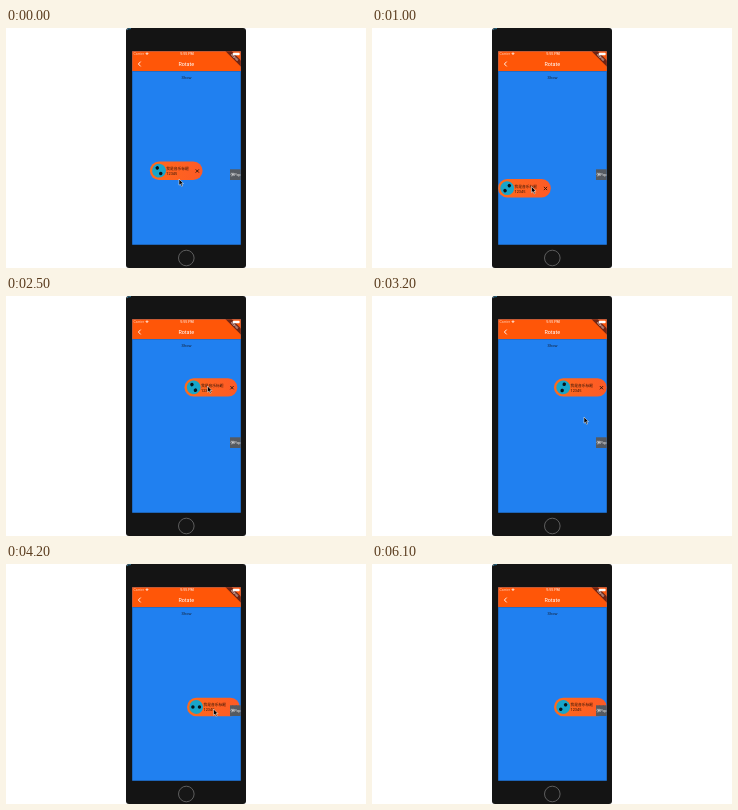
An HTML page for the animation above (6.2 s loop, 360 by 240 pixels).

```html
<!DOCTYPE html>
<html lang="zh">
<head>
<meta charset="utf-8">
<style>
  html, body { margin: 0; width: 100%; height: 100%; overflow: hidden; background: #fff; }
  svg { display: block; width: 360px; height: 240px; }
  text { font-family: Roboto, "Noto Sans CJK SC", "Noto Sans CJK", sans-serif; }
  .mid { text-anchor: middle; }
</style>
</head>
<body>
<svg viewBox="0 0 360 240">
  <defs>
    <clipPath id="screen"><rect x="126.2" y="23.2" width="108.6" height="193.6"/></clipPath>
    <linearGradient id="glow">
      <stop offset="0" stop-color="#ff6a1c"/>
      <stop offset="1" stop-color="#fd5a26"/>
    </linearGradient>
  </defs>

  <rect x="120" width="120" height="240" rx="3" fill="#141414"/>
  <path d="M121 2Q121.5 .5 125 .5" fill="none" stroke="#2c7190"/>
  <circle cx="180.3" cy="230" r="7.8" fill="#161616" stroke="#666" stroke-width=".9"/>

  <g clip-path="url(#screen)">
    <rect x="126" y="23" width="109" height="194" fill="#2080f0"/>
    <rect x="126" y="43" width="109" height=".8" fill="#2368c0"/>
    <rect x="126" y="23" width="109" height="20" fill="#ff5608"/>
    <g fill="#fff">
      <text x="127.5" y="27.3" font-size="3.5" opacity=".7">Carrier</text>
      <path d="M139.3 25.2Q141 24 142.7 25.2L141 27.2Z" opacity=".7"/>
      <text class="mid" x="181" y="27.4" font-size="3.7">5:55 PM</text>
      <text class="mid" x="180.3" y="37.8" font-size="5.4">Rotate</text>
    </g>
    <path d="M134.7 33.6L132.4 36L134.7 38.4" fill="none" stroke="#fff" stroke-width=".9"/>
    <g transform="translate(228.6 29.2) rotate(45)">
      <rect x="-12" y="-2.2" width="24" height="4.4" fill="#702414"/>
      <text class="mid" y="1" font-size="2.9" font-weight="700" fill="#fff" opacity=".8">DEBUG</text>
    </g>
    <rect x="227" y="24.8" width="6.6" height="2.4" rx=".6" fill="#fff"/>
    <text class="mid" x="180.5" y="50.8" font-size="4" fill="#16243c">Show</text>

    <g id="pill">
      <rect width="52.8" height="18.4" rx="9.2" fill="url(#glow)"/>
      <g id="disc">
        <circle r="6.9" fill="#18a5c9"/>
        <circle cx="-3.3" r="1.75" fill="#08131a"/>
        <circle cx="3.3" r="1.75" fill="#08131a"/>
      </g>
      <g fill="#331407">
        <text x="16.5" y="8.7" font-size="3.75">我是音乐标题</text>
        <text x="16.5" y="13.5" font-size="3.9">12345</text>
      </g>
      <path d="M45.9 7.9l3.2 3.2m0-3.2l-3.2 3.2" stroke="#28120a" stroke-width=".9"/>
    </g>

    <rect x="224" y="141.3" width="11" height="10.7" fill="#555a61"/>
    <text class="mid" x="229.6" y="148" font-size="3.7" fill="#fff">弹Pop</text>
    <path id="cursor" d="M0 0V6.2L1.5 5L2.6 7.4L3.7 6.9L2.6 4.6H4.5Z" fill="#000" stroke="#fff" stroke-width=".5"/>
  </g>
</svg>
<script>
const LOOP = 6200, STEP = 100, SPIN = 5000, CURSOR_EXIT = 5500;

// Each move eases to a new place: begin, end, x, y
const pillMoves = [
  [0, 0, 143.8, 133.5],
  [250, 1000, 126, 151],
  [1250, 2230, 178.5, 82.2],
  [2600, 2900, 182, 82.2],
  [3500, 4200, 181, 133.8],
  [4200, 4400, 182, 133.8]
];
const cursorMoves = [
  [0, 0, 173, 151],
  [250, 900, 159.5, 158.5],
  [1100, 1950, 201.5, 90],
  [2600, 3100, 212, 121],
  [3200, 3500, 210, 95],
  [3500, 4150, 207.5, 145],
  [4600, 5400, 222, 212]
];

const byId = id => document.getElementById(id);
const pill = byId("pill"), disc = byId("disc"), cursor = byId("cursor");

function ease(t, begin, end) {
  const k = Math.min(1, Math.max(0, (t - begin) / (end - begin || 1)));
  return k * k * (3 - 2 * k);
}

function place(el, moves, t) {
  let [, , x, y] = moves[0];
  for (const [begin, end, toX, toY] of moves) {
    const e = ease(t, begin, end);
    x += (toX - x) * e;
    y += (toY - y) * e;
  }
  el.setAttribute("transform", `translate(${x} ${y})`);
}

function draw(now) {
  const t = Math.floor((now % LOOP) / STEP) * STEP;
  place(pill, pillMoves, t);
  place(cursor, cursorMoves, t);
  cursor.setAttribute("visibility", t < CURSOR_EXIT ? "visible" : "hidden");
  disc.setAttribute("transform", `translate(9.2 9.2) rotate(${58 + t / SPIN * 360})`);
}

const start = performance.now();
function tick() {
  draw(performance.now() - start);
  requestAnimationFrame(tick);
}
tick();
</script>
</body>
</html>
```
